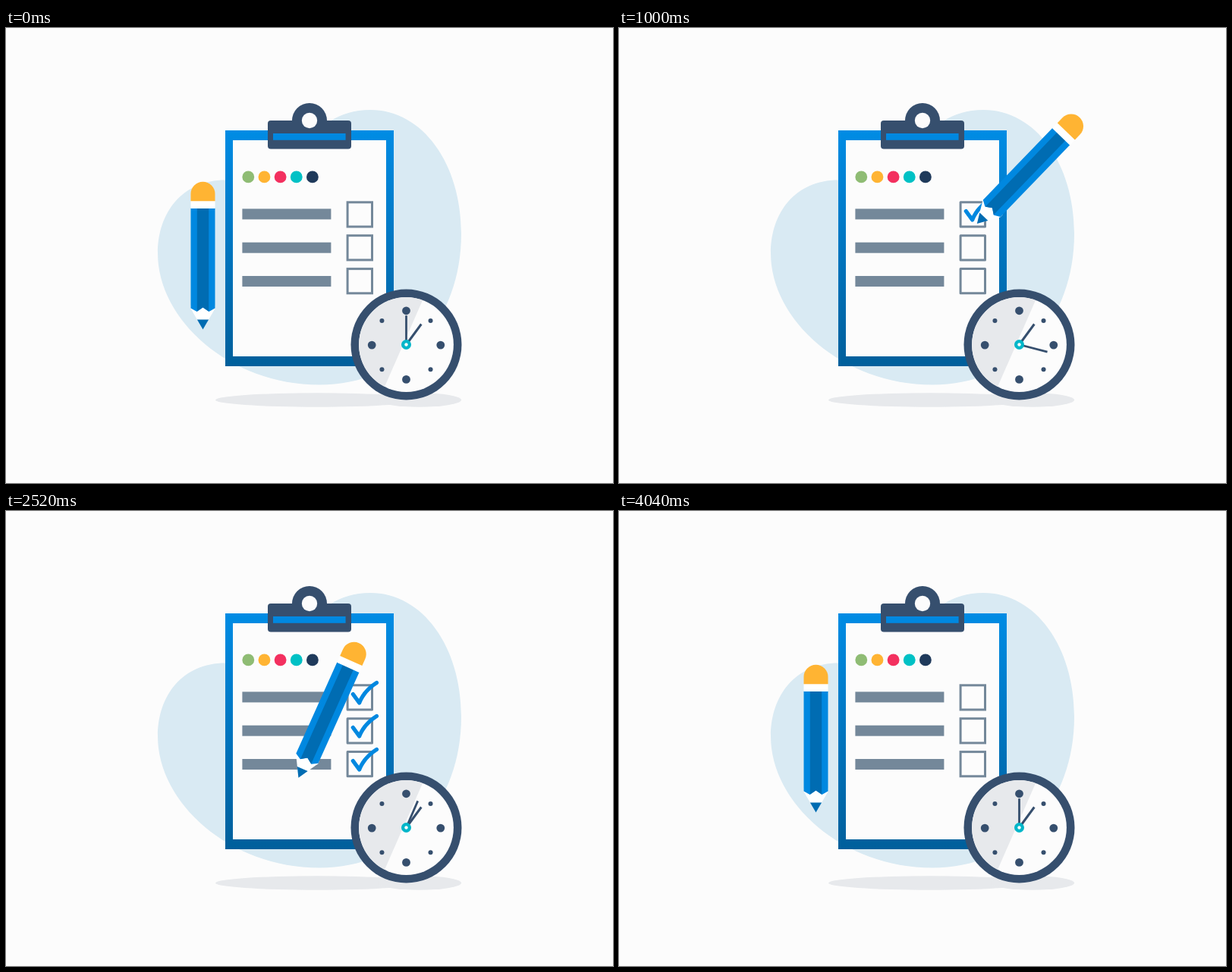
Recreate the animation shown at these times as an HTML page with a canvas. Size 800 by 600 pixels, loop 5000 ms.

```html
<!DOCTYPE html>
<html lang="en">
<head>
<meta charset="utf-8">
<title>Checklist</title>
<style>
html, body { margin: 0; width: 100%; height: 100%; overflow: hidden; background: #fcfcfc; }
canvas { display: block; width: 800px; height: 600px; }
</style>
</head>
<body>
<canvas id="stage" width="800" height="600"></canvas>
<script>
const ctx = document.getElementById('stage').getContext('2d');
const layer = document.createElement('canvas');
layer.width = 800;
layer.height = 600;
const layerCtx = layer.getContext('2d');

const LOOP = 5000, STEP = 40;
const WHITE = '#fcfcfc', NAVY = '#364f6e', BLUE = '#0088e0', DEEP = '#006cb2',
      GREY = '#74889a', AMBER = '#ffb433', SHADE = '#e7e9ec';
const ROW = 44;
const DRAW_START = 556, DRAW_TIME = 220, DRAW_GAP = 648;
const LEAVE = 2240, HOME = 2840;
const SLIDE_START = 2960, SLIDE_END = 3360, SLIDE = 118;
const REST = { x: 259.5, y: 397.5 };
const TILT = 44 * Math.PI / 180;

const clamp = v => Math.max(0, Math.min(1, v));
const mix = (a, b, p) => a + (b - a) * p;
const smooth = u => { u = clamp(u); return u * u * (3 - 2 * u); };

// Timing curve with control points (x1, 0) and (x2, 1)
function bezier(u, x1, x2) {
  let lo = 0, hi = 1;
  for (let i = 0; i < 24; i++) {
    const s = (lo + hi) / 2, r = 1 - s;
    if (3 * r * r * s * x1 + 3 * r * s * s * x2 + s * s * s < u) lo = s; else hi = s;
  }
  return lo * lo * (3 - 2 * lo);
}

function disc(c, x, y, r, color) {
  c.fillStyle = color;
  c.beginPath();
  c.arc(x, y, r, 0, Math.PI * 2);
  c.fill();
}

function box(c, x, y, w, h, color) {
  c.fillStyle = color;
  c.fillRect(x, y, w, h);
}

function poly(c, points, color) {
  c.fillStyle = color;
  c.beginPath();
  points.forEach(p => c.lineTo(p[0], p[1]));
  c.fill();
}

function oval(x, y, rx, ry, color) {
  ctx.fillStyle = color;
  ctx.beginPath();
  ctx.ellipse(x, y, rx, ry, 0, 0, Math.PI * 2);
  ctx.fill();
}

// Point on the tick of a row: a short straight stroke, then a curve
function tickPoint(row, p) {
  const dy = row * ROW, bend = 0.28;
  if (p < bend) {
    const s = p / bend;
    return { x: mix(457.3, 465.7, s), y: mix(241.5, 253, s) + dy };
  }
  const s = (p - bend) / (1 - bend), r = 1 - s;
  return {
    x: r * r * 465.7 + 2 * r * s * 472 + s * s * 488.5,
    y: r * r * 253 + 2 * r * s * 237 + s * s * 226.5 + dy
  };
}

const drawStart = row => DRAW_START + row * DRAW_GAP;
const tickAmount = (row, t) => smooth((t - drawStart(row)) / DRAW_TIME);

function drawTick(c, row, amount) {
  if (amount <= 0) return;
  c.strokeStyle = BLUE;
  c.lineWidth = 5.2;
  c.lineCap = c.lineJoin = 'round';
  c.beginPath();
  const n = 50;
  for (let i = 0; i <= n; i++) {
    const p = tickPoint(row, amount * i / n);
    c.lineTo(p.x, p.y);
  }
  c.stroke();
}

function drawSheet(c, ticks) {
  box(c, 299, 148, 202, 285, WHITE);
  ['#8fbc74', AMBER, '#f3305f', '#00c1c5', '#1f3a5b'].forEach((color, i) =>
    disc(c, 319.3 + i * 21.15, 196.4, 7.9, color));
  for (let row = 0; row < 3; row++) {
    box(c, 311.4, 238.4 + row * 44.3, 117, 14, GREY);
    c.strokeStyle = GREY;
    c.lineWidth = 3;
    c.strokeRect(450.1, 229.8 + row * 43.9, 32.4, 32.2);
  }
  ticks.forEach((amount, row) => drawTick(c, row, amount));
}

function drawBackdrop() {
  box(ctx, 0, 0, 800, 600, WHITE);
  ctx.fillStyle = '#d9eaf3';
  ctx.beginPath();
  ctx.moveTo(480, 108);
  ctx.bezierCurveTo(550, 108, 600, 180, 600, 271);
  ctx.bezierCurveTo(600, 385, 525, 470.5, 413, 470.5);
  ctx.bezierCurveTo(295, 470.5, 200, 385, 200, 297);
  ctx.bezierCurveTo(200, 243, 233, 200.5, 289, 200.5);
  ctx.bezierCurveTo(385, 200, 395, 108, 480, 108);
  ctx.fill();
  oval(410, 490.5, 134, 9.2, SHADE);
  oval(545, 490.5, 55, 9.2, SHADE);
}

function drawBoard(t) {
  const grad = ctx.createLinearGradient(0, 135, 0, 446);
  grad.addColorStop(0, '#008ce4');
  grad.addColorStop(1, '#005f9b');
  box(ctx, 289, 135, 222, 311, grad);
  drawSheet(ctx, []);

  const slide = clamp((t - SLIDE_START) / (SLIDE_END - SLIDE_START));
  if (slide < 1) {
    layerCtx.clearRect(0, 0, 800, 600);
    drawSheet(layerCtx, [0, 1, 2].map(row => tickAmount(row, t)));
    ctx.globalAlpha = 1 - slide;
    ctx.drawImage(layer, 0, slide * SLIDE);
    ctx.globalAlpha = 1;
  }

  disc(ctx, 400, 122, 23, NAVY);
  ctx.beginPath();
  ctx.roundRect(345, 122, 110, 37.6, 4);
  ctx.fill();
  box(ctx, 352, 139, 95.6, 8.8, BLUE);
  disc(ctx, 400, 122, 10.2, WHITE);
}

function hand(angle, length, width) {
  ctx.strokeStyle = NAVY;
  ctx.lineWidth = width;
  ctx.lineCap = 'butt';
  ctx.beginPath();
  ctx.moveTo(527.5, 417.5);
  ctx.lineTo(527.5 + Math.sin(angle) * length, 417.5 - Math.cos(angle) * length);
  ctx.stroke();
}

function drawClock(t) {
  const x = 527.5, y = 417.5;
  disc(ctx, x, y, 73, NAVY);
  disc(ctx, x, y, 62.4, WHITE);
  ctx.fillStyle = SHADE;
  ctx.beginPath();
  ctx.arc(x, y, 62.4, Math.atan2(55.5, -28.5), Math.atan2(-58.5, 21.5) + Math.PI * 2);
  ctx.fill();
  for (let i = 0; i < 8; i++) {
    const a = i * Math.PI / 4, r = 45.3;
    disc(ctx, x + Math.sin(a) * r, y + 0.6 - Math.cos(a) * r, i % 2 ? 3 : 5.4, NAVY);
  }
  hand(36.3 * Math.PI / 180, 33.5, 3);
  const turn = t < 4000 ? bezier(t % 2000 / 2000, 0.642, 0.694) : 0;
  hand(turn * Math.PI * 2, 38.3, 2.8);
  disc(ctx, x, y, 6.5, '#00b6c9');
  disc(ctx, x, y, 2.2, WHITE);
}

function pencilPose(t) {
  const travel = (a, b, from, to) => {
    const p = smooth((t - from) / (to - from));
    return { x: mix(a.x, b.x, p), y: mix(a.y, b.y, p), p };
  };
  if (t < DRAW_START) {
    const pos = travel(REST, tickPoint(0, 0), 0, DRAW_START);
    return { ...pos, angle: TILT * pos.p };
  }
  if (t >= LEAVE) {
    const pos = travel(tickPoint(2, 1), REST, LEAVE, HOME);
    return { ...pos, angle: TILT * (1 - pos.p) };
  }
  const row = Math.min(2, Math.floor((t - DRAW_START) / DRAW_GAP));
  const end = drawStart(row) + DRAW_TIME;
  const pos = t < end || row === 2
    ? tickPoint(row, tickAmount(row, t))
    : travel(tickPoint(row, 1), tickPoint(row + 1, 0), end, drawStart(row + 1));
  return { ...pos, angle: TILT };
}

// The pencil tip sits at the local zero point
function drawPencil(t) {
  const pose = pencilPose(t);
  ctx.save();
  ctx.translate(pose.x, pose.y);
  ctx.rotate(pose.angle);
  poly(ctx, [[-16, -32], [16, -32], [16, -27.5], [0, 0], [-16, -27.5]], '#fff');
  poly(ctx, [[-7.6, -13], [7.6, -13], [0, 0]], DEEP);
  poly(ctx, [[-16, -160], [16, -160], [16, -28], [8, -23.5], [0, -29], [-8, -23.5], [-16, -28]], BLUE);
  poly(ctx, [[-7.7, -160], [7.7, -160], [7.7, -23.7], [0, -29], [-7.7, -23.7]], DEEP);
  box(ctx, -16, -169.5, 32, 10, '#fff');
  ctx.fillStyle = AMBER;
  ctx.beginPath();
  ctx.arc(0, -178.8, 16, Math.PI, 0);
  ctx.lineTo(16, -169.2);
  ctx.lineTo(-16, -169.2);
  ctx.fill();
  ctx.restore();
}

function render(now) {
  const t = Math.floor(now % LOOP / STEP) * STEP;
  drawBackdrop();
  drawBoard(t);
  drawClock(t);
  drawPencil(t);
}

let origin = null;
function tick(now) {
  if (origin === null) origin = now;
  render(now - origin);
  requestAnimationFrame(tick);
}
render(0);
requestAnimationFrame(tick);
</script>
</body>
</html>
```
